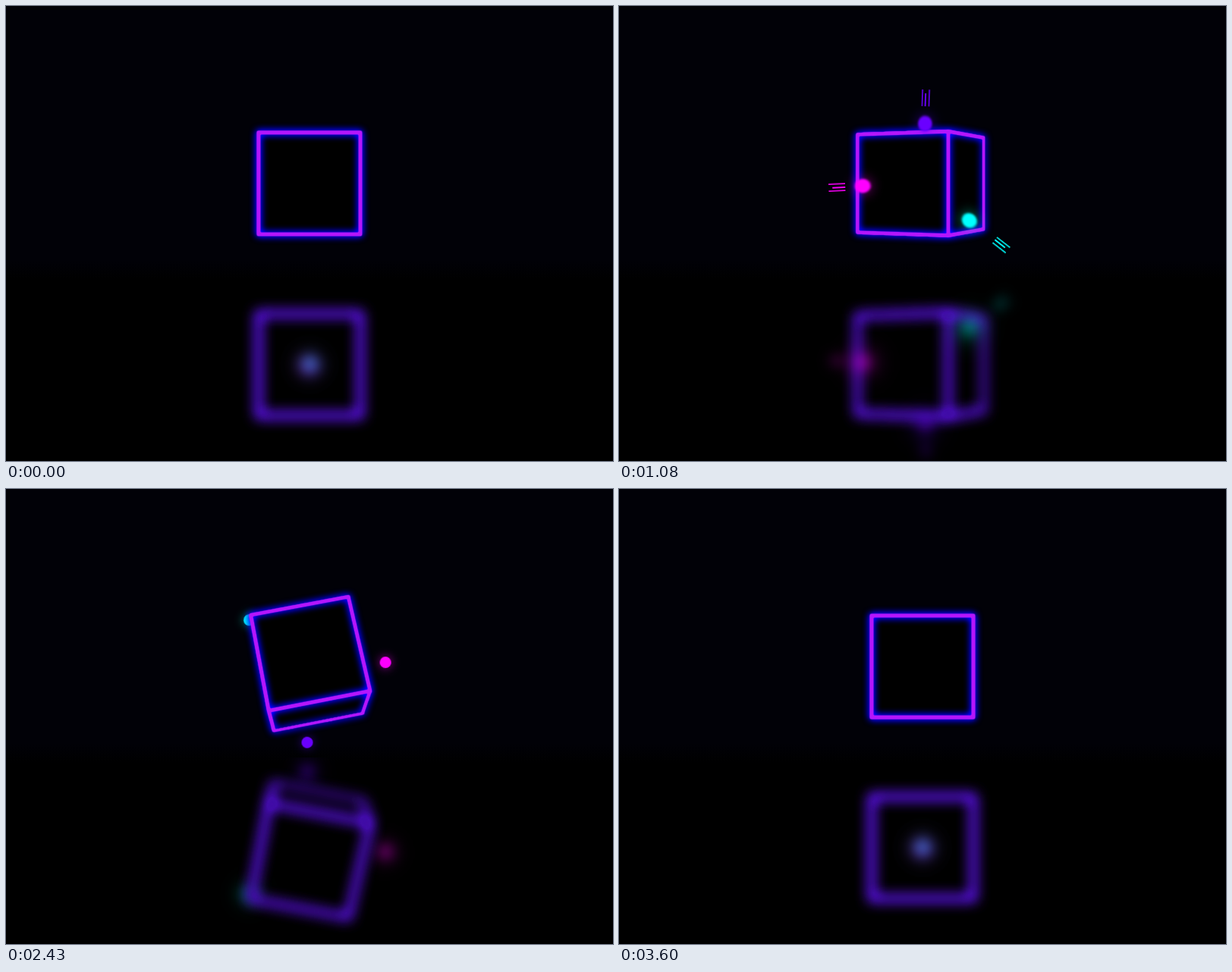
An HTML page without scripts that plays this animation: 800 by 600 pixels, repeating every 3.63 s.

```html
<!DOCTYPE html>
<html lang="en">
<head>
<meta charset="utf-8">
<title>Neon cube</title>
<style>
:root { --loop: 3630ms linear infinite; }
html, body { margin: 0; width: 100%; height: 100%; overflow: hidden; background: #000; }
.stage {
  position: relative; width: 800px; height: 600px; overflow: hidden;
  background: linear-gradient(#010107 0 335px, #000 362px);
}
.world { position: absolute; left: 0; top: 0; width: 800px; height: 600px; }
.filters { position: absolute; width: 0; height: 0; }

/* Mirror image below the floor line */
.floor { position: absolute; left: 0; top: 353.5px; width: 800px; height: 246.5px; overflow: hidden; }
.floor .world { top: -246.5px; transform: scaleY(-1); }

/* Cube: thin face borders, thickened and lit by the neon filter */
.scene {
  position: absolute; z-index: 1; left: 280px; top: 114px; width: 240px; height: 240px;
  perspective: 908px; filter: url(#neon);
}
.floor .scene { filter: url(#haze); }
.cube {
  position: absolute; left: 120px; top: 120px; width: 0; height: 0;
  transform-style: preserve-3d; animation: tumble var(--loop);
}
.cube i {
  --line: 3px; --size: calc(125px + var(--line));
  position: absolute; box-sizing: border-box;
  width: var(--size); height: var(--size);
  left: calc(var(--size) / -2); top: calc(var(--size) / -2);
  border: var(--line) solid #b416fc; background: #000;
  transform: var(--turn) translateZ(62.5px);
}
.floor .cube i { --line: 5px; }
.front { --turn: rotateY(0deg); }
.right { --turn: rotateY(90deg); }
.back { --turn: rotateY(180deg); }
.left { --turn: rotateY(-90deg); }
.top { --turn: rotateX(90deg); }
.bottom { --turn: rotateX(-90deg); }

/* Balls share one distance along three axes through the cube */
.balls { position: absolute; z-index: 0; left: 400px; top: 234px; animation: layer var(--loop); }
.axis { position: absolute; width: 0; height: 0; transform: rotate(var(--angle)); }
.magenta { --angle: 177.2deg; --glow: #ff00ff70; color: #f0f; }
.violet { --angle: -88deg; --glow: #5000ff60; color: #6a00ff; }
.cyan { --angle: 37.9deg; --glow: #00ffd870; color: #0ff; }
.ball {
  position: absolute; left: -7.5px; top: -7.5px; width: 15px; height: 15px;
  border-radius: 50%; background: currentColor; box-shadow: 0 0 12px 1px var(--glow);
  animation: travel var(--loop), hit var(--loop);
}
.streaks {
  position: absolute; left: 102px; top: -5.5px; width: 23px; height: 11px;
  background:
    linear-gradient(currentColor 0 0) 0 0 / 22px 1.6px no-repeat,
    linear-gradient(currentColor 0 0) 0 50% / 17px 2.4px no-repeat,
    linear-gradient(currentColor 0 0) 0 100% / 22px 1.6px no-repeat;
  animation: streak var(--loop);
}
.cyan .streaks { left: 121px; }
.floor .axis { opacity: .5; filter: blur(8px); }
.floor .ball { box-shadow: 0 0 16px 7px var(--glow); }

@keyframes tumble {
  0% { transform: rotateX(0deg) rotateZ(0deg) rotateY(0deg); }
  29.75% {
    transform: rotateX(0deg) rotateZ(0deg) rotateY(-24.5deg);
    animation-timing-function: ease-in-out;
  }
  54.55% {
    transform: rotateX(-11.7deg) rotateZ(9.45deg) rotateY(0deg);
    animation-timing-function: cubic-bezier(.4, 0, .75, .7);
  }
  66.94% {
    transform: rotateX(16.1deg) rotateZ(-11.2deg) rotateY(0deg);
    animation-timing-function: cubic-bezier(.3, .45, .65, .85);
  }
  85.95% {
    transform: rotateX(22.5deg) rotateZ(-63.4deg) rotateY(0deg);
    animation-timing-function: cubic-bezier(.4, .2, .6, 1);
  }
  99.17%, 100% { transform: rotateX(0deg) rotateZ(-90deg) rotateY(0deg); }
}
/* Quadratic ease out to each far point, ease in on the way back */
@keyframes travel {
  0% { translate: 0px; animation-timing-function: cubic-bezier(.333, .667, .667, 1); }
  19.28% { translate: 172px; animation-timing-function: cubic-bezier(.333, 0, .667, .333); }
  29.75% { translate: 79px; animation-timing-function: cubic-bezier(.333, .667, .667, 1); }
  50.41% { translate: -173px; animation-timing-function: cubic-bezier(.333, 0, .667, .333); }
  76.03%, 100% { translate: 0px; }
}
@keyframes hit {
  0%, 26% { scale: 1; filter: blur(0); }
  29.75% { scale: 1.4 1.25; filter: blur(1px); }
  33%, 100% { scale: 1; filter: blur(0); }
}
@keyframes streak {
  0%, 27.2% { opacity: 0; translate: 16px; }
  28.5% { opacity: 1; }
  29.75% { opacity: 1; translate: 0px; }
  31.4%, 100% { opacity: 0; translate: -6px; }
}
@keyframes layer {
  0%, 24% { z-index: 0; }
  24.01%, 30.9% { z-index: 2; }
  30.91%, 100% { z-index: 0; }
}
</style>
</head>
<body>
<svg class="filters" aria-hidden="true">
  <!-- Both filters first turn the purple edges into an alpha mask -->
  <filter id="neon" x="-10%" y="-10%" width="120%" height="120%" color-interpolation-filters="sRGB">
    <feColorMatrix values="0 0 0 0 .706  0 0 0 0 .086  0 0 0 0 .988  1.416 0 0 1 -1"/>
    <feGaussianBlur stdDeviation="1.2"/>
    <feComponentTransfer result="tube"><feFuncA type="linear" slope="3" intercept="-.1"/></feComponentTransfer>
    <feGaussianBlur stdDeviation="4.8"/>
    <feColorMatrix values="0 0 0 0 0  0 0 0 0 0  0 0 0 0 1  0 0 0 1.9 0" result="glow"/>
    <feMerge>
      <feMergeNode in="SourceGraphic"/><feMergeNode in="glow"/><feMergeNode in="tube"/>
    </feMerge>
  </filter>
  <filter id="haze" x="-20%" y="-20%" width="140%" height="140%" color-interpolation-filters="sRGB">
    <feColorMatrix values="0 0 0 0 .25  0 0 0 0 .045  0 0 0 0 .65  1.416 0 0 1 -1"/>
    <feGaussianBlur stdDeviation="8.5"/>
    <feComponentTransfer><feFuncA type="linear" slope="3.2"/></feComponentTransfer>
  </filter>
</svg>
<div class="stage">
  <div class="floor">
    <div class="world">
      <div class="scene"><div class="cube">
        <i class="back"></i><i class="left"></i><i class="right"></i>
        <i class="top"></i><i class="bottom"></i><i class="front"></i>
      </div></div>
      <div class="balls">
        <div class="axis magenta"><b class="streaks"></b><b class="ball"></b></div>
        <div class="axis violet"><b class="streaks"></b><b class="ball"></b></div>
        <div class="axis cyan"><b class="streaks"></b><b class="ball"></b></div>
      </div>
    </div>
  </div>
  <div class="world">
    <div class="scene"><div class="cube">
      <i class="back"></i><i class="left"></i><i class="right"></i>
      <i class="top"></i><i class="bottom"></i><i class="front"></i>
    </div></div>
    <div class="balls">
      <div class="axis magenta"><b class="streaks"></b><b class="ball"></b></div>
      <div class="axis violet"><b class="streaks"></b><b class="ball"></b></div>
      <div class="axis cyan"><b class="streaks"></b><b class="ball"></b></div>
    </div>
  </div>
</div>
</body>
</html>
```
